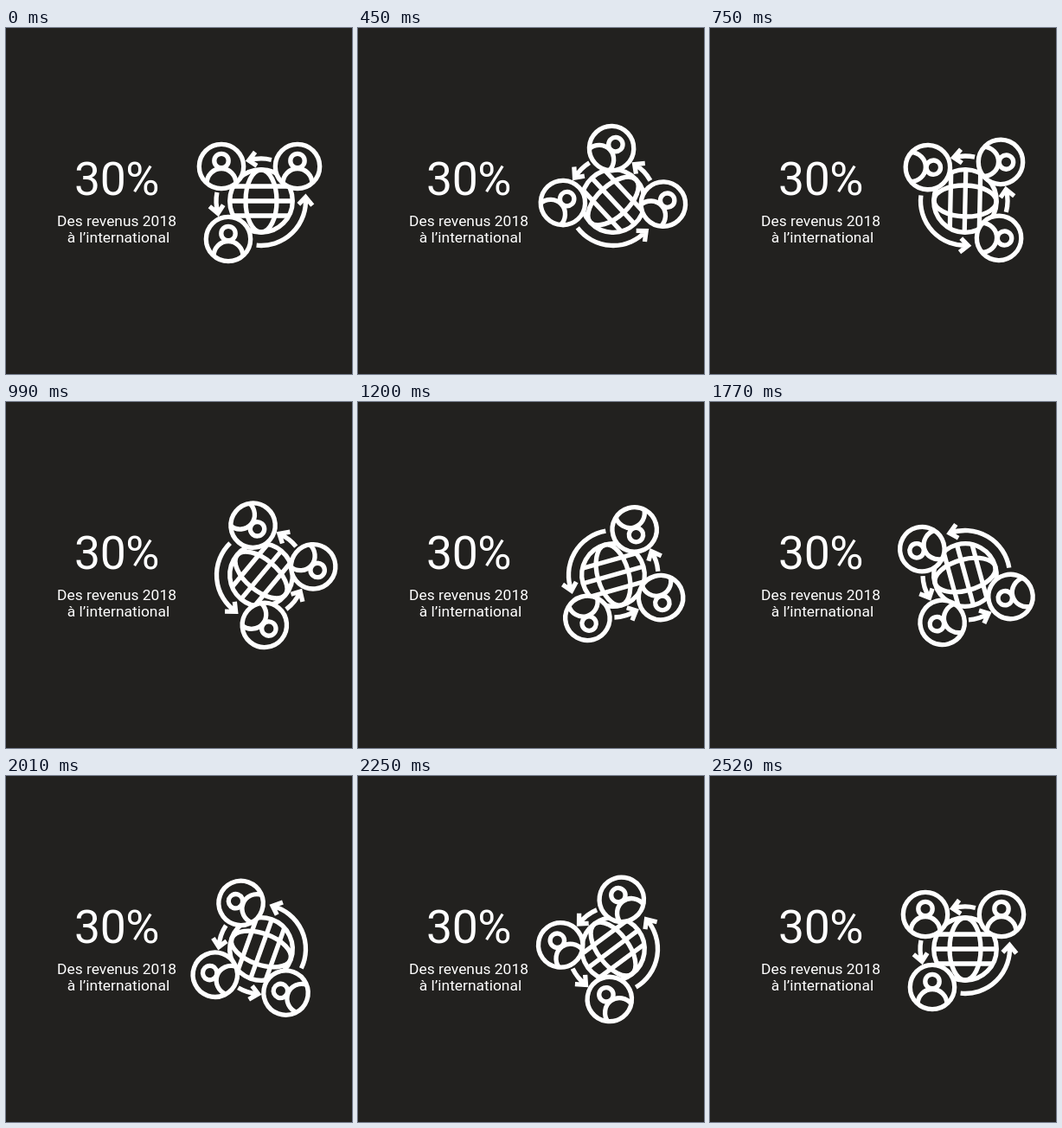
An HTML page that plays this animation: 400x400 px, repeating every 2920 ms.

```html
<!DOCTYPE html>
<html lang="fr">
<head>
<meta charset="utf-8">
<style>
  html, body { margin: 0; height: 100%; overflow: hidden; background: #22211f; }
  svg { display: block; width: 100vw; height: 100vh; }
  text { fill: #fff; font: 17.4px Roboto, sans-serif; text-anchor: middle; }
  .big { font-size: 53.5px; letter-spacing: -.5px; }
  #icon { fill: none; stroke: #fff; stroke-width: 5.3; }
  .disc { fill: #22211f; }
</style>
</head>
<body>
<svg viewBox="0 0 400 400">
  <defs>
    <g id="person">
      <circle class="disc" r="25.7"/>
      <path d="M-17 20A17 17.5 0 0 1 17 20"/>
      <circle class="disc" cy="-6.5" r="8.2"/>
    </g>
  </defs>
  <text class="big" x="128" y="193">30%</text>
  <text x="128" y="229">Des revenus 2018</text>
  <text x="130" y="248">à l’international</text>
  <g id="icon">
    <circle r="36.3"/>
    <ellipse rx="18" ry="36"/>
    <path d="M-32-17H32M-36 0H36M-32 17H32"/>
    <use href="#person" x="-46" y="-40"/>
    <use href="#person" x="42" y="-40"/>
    <use href="#person" x="-38" y="44"/>
  </g>
</svg>
<script>
const STEP = 30, SPIN = 2520, LOOP = 2920;
const icon = document.getElementById('icon');

// Curved arrow around the globe, running counterclockwise (degrees).
function addArrow(radius, from, to) {
  const point = (r, deg) => {
    const a = deg * Math.PI / 180;
    return `${r * Math.cos(a)} ${r * Math.sin(a)}`;
  };
  const wing = 10;
  const path = document.createElementNS(icon.namespaceURI, 'path');
  path.setAttribute('d',
    `M${point(radius, from)}A${radius} ${radius} 0 0 0 ${point(radius, to)}` +
    `M${point(radius - 8, to + wing)}L${point(radius, to)}L${point(radius + 8, to + wing)}`);
  icon.append(path);
}
addArrow(49, -76, -107);
addArrow(52, 191, 164);
addArrow(51.5, 96, -5);

// Gentle start, nearly steady afterwards.
const ease = t => t + t * (1 - t) * (-0.53 + 1.28 * t - 0.7 * t * t);

function draw(now) {
  const time = Math.floor(now % LOOP / STEP) * STEP;
  const angle = 360 * ease(Math.min(time / SPIN, 1));
  icon.setAttribute('transform', `translate(295 200) rotate(${angle})`);
}

const start = performance.now();
function tick() {
  draw(performance.now() - start);
  requestAnimationFrame(tick);
}
tick();
</script>
</body>
</html>
```
